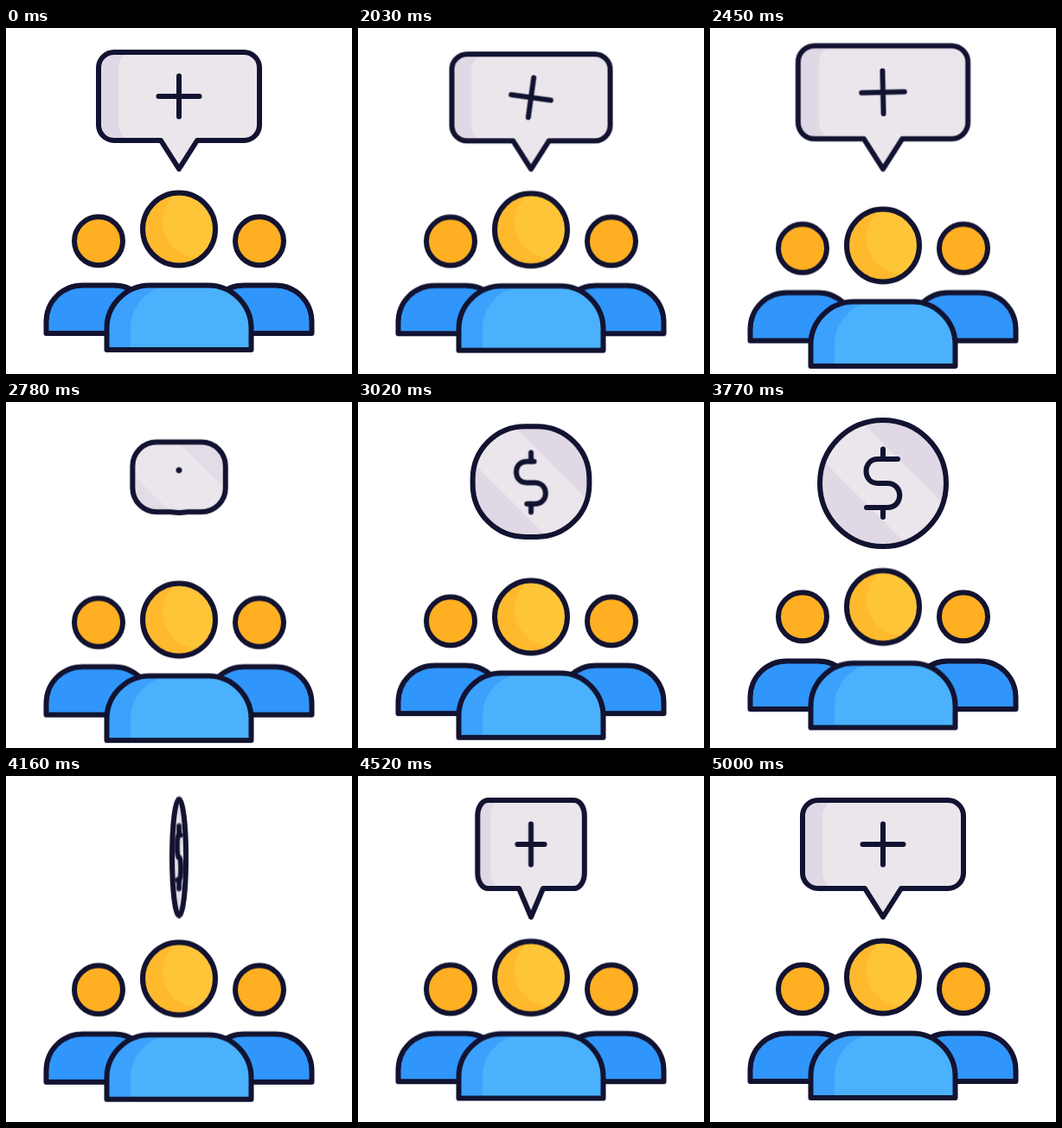
An HTML page without scripts that plays this animation: 400x400 px, repeating every 5030 ms.

```html
<!DOCTYPE html>
<html lang="en">
<head>
<meta charset="utf-8">
<title>Team funding</title>
<style>
:root {
  --line: #121331;
  --pale: #ebe6ec;
  --shade: #e0d8e4;
  --smooth: cubic-bezier(.4, 0, .2, 1);
  --bubble: path("M125 28L275 28C285 28 293 36 293 46L293 112C293 122 285 130 275 130L221 130L200 163L179 130L125 130C115 130 107 122 107 112L107 46C107 36 115 28 125 28Z");
  --pebble: path("M175.5 47L224.5 47C240 47 252.5 59.5 252.5 75L252.5 99C252.5 114.5 240 127 224.5 127L210 127L200 127L190 127L175.5 127C160 127 147.5 114.5 147.5 99L147.5 75C147.5 59.5 160 47 175.5 47Z");
  --coin: path("M200 21L200 21C240.3 21 273 53.7 273 94L273 94C273 134.3 240.3 167 200 167L200 167L200 167L200 167L200 167C159.7 167 127 134.3 127 94L127 94C127 53.7 159.7 21 200 21Z");
}
html, body { margin: 0; width: 100%; height: 100%; overflow: hidden; background: #fff; }
svg { display: block; width: 100%; height: 100%; }

.ink { stroke: var(--line); stroke-width: 6; stroke-linecap: round; stroke-linejoin: round; }
.thin { fill: none; vector-effect: non-scaling-stroke; }
.anim, .anim * {
  animation-duration: 5030ms;
  animation-iteration-count: infinite;
  animation-timing-function: linear;
}

/* people */
.front { --drop: 20px; animation-name: drop; }
.back { --drop: 9px; animation-name: drop; }
@keyframes drop {
  0% { transform: translateY(0); }
  39.76% { transform: translateY(0); animation-timing-function: var(--smooth); }
  52.49% { transform: translateY(var(--drop)); animation-timing-function: var(--smooth); }
  99.4%, 100% { transform: translateY(0); }
}

/* speech bubble and coin */
.shell { d: var(--bubble); animation-name: morph; }
@keyframes morph {
  0% { d: var(--bubble); }
  50.89% { d: var(--bubble); animation-timing-function: var(--smooth); }
  56.46% { d: var(--pebble); animation-timing-function: var(--smooth); }
  64.81%, 85.69% { d: var(--coin); }
  85.7%, 100% { d: var(--bubble); }
}

.flip { transform-origin: 200px 95.5px; animation-name: flip; }
@keyframes flip {
  0%, 64.81% { transform: scale(1, 1); }
  77.53% { transform: scale(1, 1); animation-timing-function: var(--smooth); }
  85.69% { transform: scale(.02, .92); }
  85.7% { transform: scale(.02, 1); animation-timing-function: var(--smooth); }
  96.62%, 100% { transform: scale(1, 1); }
}

.squash { transform-origin: 200px 163px; animation-name: squash; }
@keyframes squash {
  0% { transform: scale(1); }
  39.76% { transform: scale(1); animation-timing-function: cubic-bezier(.3, 0, .3, 1); }
  44.14% { transform: scale(.82); animation-timing-function: var(--smooth); }
  50.89% { transform: scale(1.073); animation-timing-function: var(--smooth); }
  56.46%, 100% { transform: scale(1); }
}

.side { animation-name: side; }
@keyframes side {
  0%, 50.89% { opacity: 1; }
  53.7%, 85.69% { opacity: 0; }
  85.7%, 100% { opacity: 1; }
}

.bands { animation-name: bands; }
@keyframes bands {
  0%, 52.5% { opacity: 0; }
  56.46%, 85.69% { opacity: 1; }
  85.7%, 100% { opacity: 0; }
}

.plus { transform-origin: 200px 79px; animation-name: plus; }
@keyframes plus {
  0% { transform: rotate(0deg) scale(1); opacity: 1; }
  39.76% { transform: rotate(0deg) scale(1); animation-timing-function: var(--smooth); }
  49.9% { transform: rotate(180deg) scale(1); }
  50.89% { transform: rotate(180deg) scale(1); opacity: 1; animation-timing-function: var(--smooth); }
  55.6% { transform: rotate(180deg) scale(.02); opacity: 1; }
  55.61%, 85.69% { transform: rotate(180deg) scale(1); opacity: 0; }
  85.7%, 100% { transform: rotate(180deg) scale(1); opacity: 1; }
}

.money { transform-origin: 200px 94px; animation-name: money; }
@keyframes money {
  0%, 55.6% { transform: translateY(-3px) scale(.4); opacity: 0; }
  56.46% { transform: translateY(-3px) scale(.55); opacity: 1; animation-timing-function: var(--smooth); }
  64.81%, 85.69% { transform: translateY(0) scale(1); opacity: 1; }
  85.7%, 100% { transform: translateY(0) scale(1); opacity: 0; }
}

.ess { animation-name: ess; }
@keyframes ess {
  0%, 56.46% {
    d: path("M196 66L194 66C176 66 176 94 194 94L205 94C224 94 224 122 205 122L203 122");
    animation-timing-function: ease-in-out;
  }
  64.81%, 100% {
    d: path("M217 66L194 66C176 66 176 94 194 94L205 94C224 94 224 122 205 122L181 122");
  }
}
</style>
</head>
<body>
<svg viewBox="0 0 400 400" class="anim">
  <defs>
    <clipPath id="inside"><path class="shell"/></clipPath>
    <clipPath id="face"><circle cx="200" cy="232.5" r="42"/></clipPath>
    <g id="mate">
      <path class="ink" fill="#3096fc" d="M46.5 353V340C46.5 316 65 297.5 89 297.5H124.500C148.500 297.5 167 316 167 340V353Z"/>
      <circle class="ink" fill="#ffaf22" cx="107" cy="246.300" r="28"/>
    </g>
  </defs>

  <g class="back">
    <use href="#mate"/>
    <use href="#mate" transform="matrix(-1 0 0 1 400 0)"/>
  </g>

  <g class="front">
    <path fill="#4ab1fc" d="M116.5 372V347C116.5 320 139 297.5 166 297.5H234C261 297.5 283.5 320 283.5 347V372Z"/>
    <path fill="#3ba1fc" d="M116.5 372V347C116.5 320 139 297.5 166 297.5H194C166 297.5 144 320 144 347V372Z"/>
    <path class="ink" fill="none" d="M116.5 372V347C116.5 320 139 297.5 166 297.5H234C261 297.5 283.5 320 283.5 347V372Z"/>
    <circle fill="#ffb92d" cx="200" cy="232.5" r="42"/>
    <circle fill="#ffc538" cx="223" cy="224" r="42" clip-path="url(#face)"/>
    <circle class="ink" fill="none" cx="200" cy="232.5" r="42"/>
  </g>

  <g class="flip">
    <g class="squash">
      <path class="shell" fill="var(--pale)"/>
      <g clip-path="url(#inside)" fill="var(--shade)">
        <path class="side" d="M100 20H148V28C138 28 130 36 130 46V112C130 122 138 130 148 130H100Z"/>
        <path class="bands" d="M160 8L300 148V0ZM100 37L250 187H100Z"/>
      </g>
      <path class="shell ink thin"/>
      <path class="plus ink thin" d="M176.5 79H223.5M200 55.5V102.5"/>
    </g>
    <g class="money">
      <path class="ess ink thin"/>
      <path class="ink thin" d="M200 54.500V66M200 122V133"/>
    </g>
  </g>
</svg>
</body>
</html>
```
